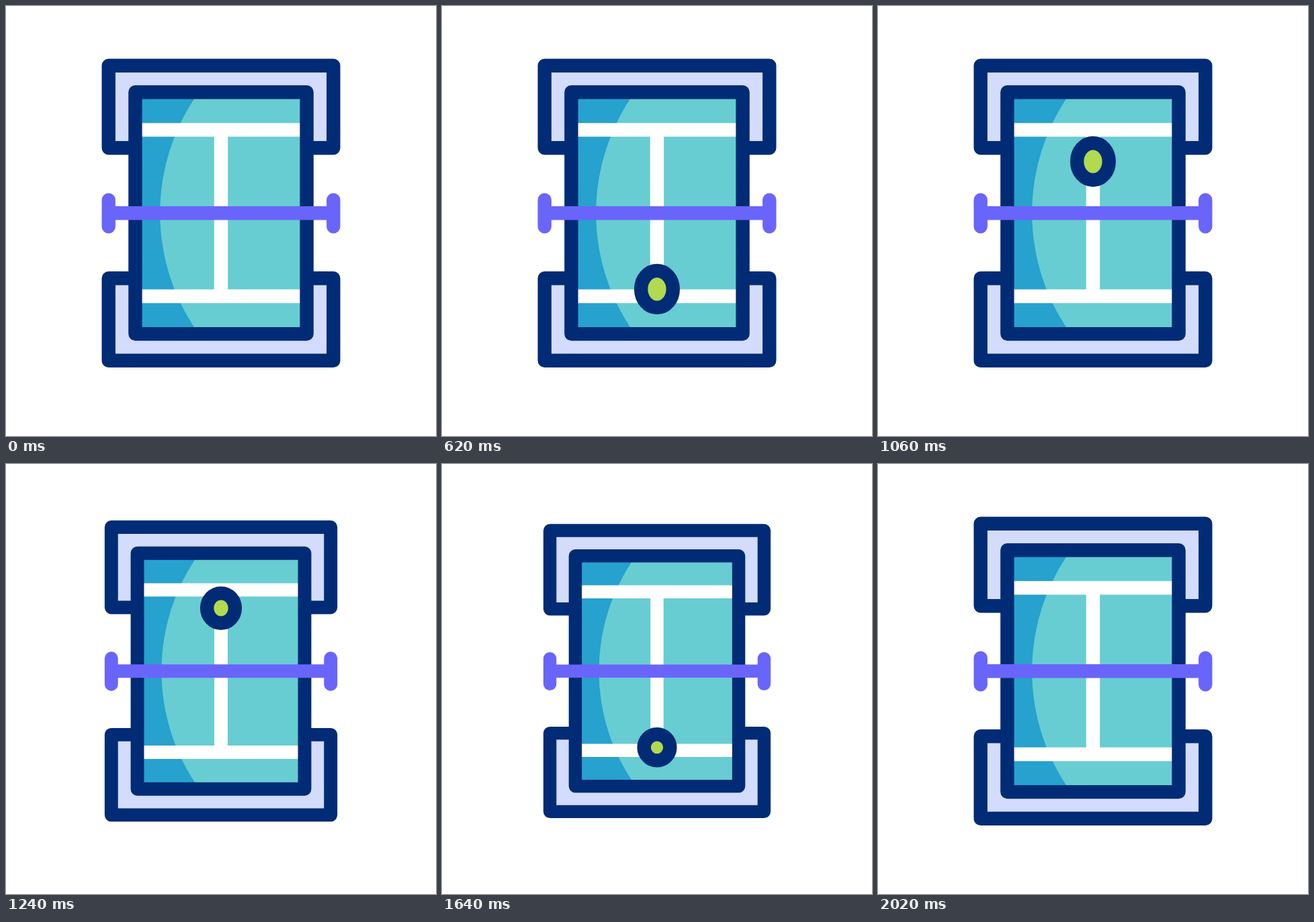
An HTML page that plays this animation: 640x640 px, repeating every 2.8 s.

```html
<!DOCTYPE html>
<html lang="en">
<head>
<meta charset="utf-8">
<title>Tennis court</title>
<style>
  html, body { margin: 0; width: 100%; height: 100%; overflow: hidden; background: #fff; }
  svg { display: block; width: 100%; height: 100%; }
  .line { fill: none; stroke-width: 20.4; stroke-linejoin: round; }
  .navy { stroke: #022b76; }
  .white { stroke: #fff; }
  .net { stroke: #6a65fa; stroke-linecap: round; }
  .stand { fill: #d3dcfd; }
  .ball { fill: #b1da50; }
  #court { transform-origin: 320px 308.2px; }
</style>
</head>
<body>
<svg viewBox="0 0 640 640">
  <g id="court">
    <path id="stand" class="line navy stand" d="M192.4 211.2H152.7V88.7H487.3V211.2H447.6"/>
    <use href="#stand" transform="translate(0 616.4) scale(1 -1)"/>
    <path fill="#67cdd2" d="M192.4 128.3H447.6V488.1H192.4Z"/>
    <path fill="#27a1cd" d="M192.4 128.3H287A309 309 0 0 0 287 488.1H192.4Z"/>
    <path class="line white" d="M192.4 184.4H447.6M192.4 432H447.6M320 184.4V432"/>
    <path class="line navy" d="M192.4 128.3H447.6V488.1H192.4Z"/>
    <path class="line net" d="M152.7 288.7V328.2M487.3 288.7V328.2M152.7 308.2H487.3"/>
  </g>
  <ellipse id="ball" class="line navy ball" cx="320"/>
</svg>
<script>
  const LOOP = 2800;
  const BEAT = 440;
  const LAG = 20; // the squash peaks just after the turn
  const enter = 310, leave = 2012;
  const hits = [0, 1, 2].map(i => 725 + i * BEAT);
  const squashes = hits.map(t => t + LAG);
  const turns = [enter, ...hits, leave];
  const heights = [284, 447, 196, 430.5, 36];

  const court = document.getElementById('court');
  const ball = document.getElementById('ball');

  const clamp = x => Math.min(1, Math.max(0, x));
  const smooth = x => { const u = clamp(x); return u * u * (3 - 2 * u); };
  const mix = (a, b, u) => a + (b - a) * u;

  // 1 at the nearest of the given times, easing to 0 at `width` ms away.
  const bump = (t, times, width) =>
    smooth(1 - Math.min(...times.map(c => Math.abs(t - c))) / width);

  function ballY(t) {
    const i = turns.findIndex(end => t < end);
    return mix(heights[i - 1], heights[i], smooth((t - turns[i - 1]) / (turns[i] - turns[i - 1])));
  }

  function draw(t) {
    court.style.transform = `scale(${1 - 0.05 * bump(t, squashes, 110)})`;

    const visible = t >= enter && t < leave;
    ball.style.display = visible ? '' : 'none';
    if (!visible) return;

    const round = bump(t, [enter, ...squashes, leave], 140);
    ball.setAttribute('cy', ballY(t));
    ball.setAttribute('rx', mix(24, 19.2, round));
    ball.setAttribute('ry', mix(27.8, 19.2, round));
  }

  const start = performance.now();
  function tick() {
    draw((performance.now() - start) % LOOP);
    requestAnimationFrame(tick);
  }
  tick();
</script>
</body>
</html>
```
